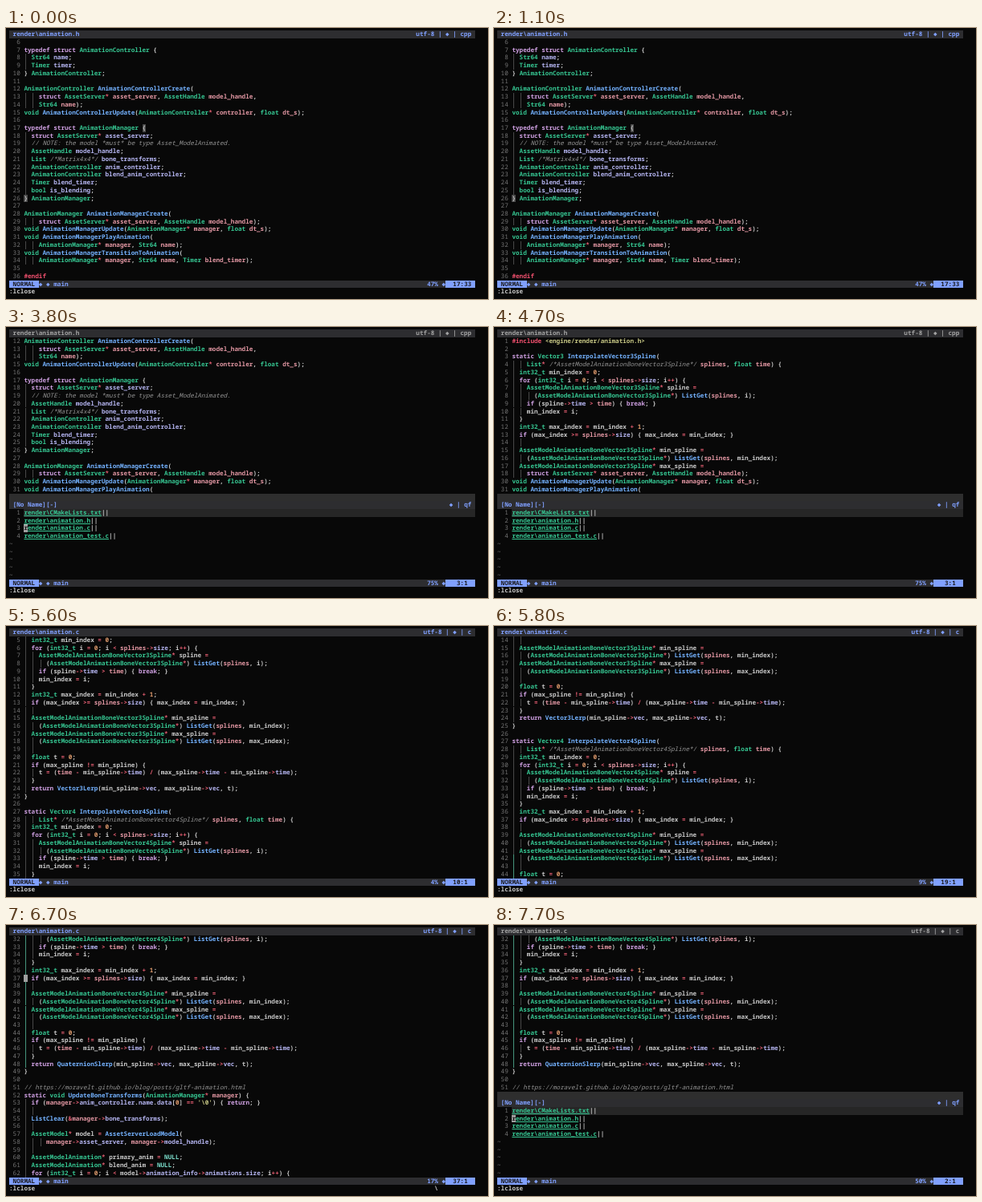
An HTML page for the animation above (8000 ms loop, 600 by 338 pixels).

```html
<!DOCTYPE html>
<html lang="en">
<head>
<meta charset="utf-8">
<title>Editor session</title>
<style>
html, body { margin: 0; width: 100%; height: 100%; overflow: hidden; background: #080808; }
#screen {
  position: absolute; left: 0; top: 0; width: 600px; height: 338px; overflow: hidden;
  font: 600 7.672px/11.9px "Noto Sans Mono", "DejaVu Sans Mono", monospace;
  font-variant-ligatures: none; text-rendering: geometricPrecision;
  color: #c8c8c8;
}
#screen div { position: absolute; white-space: pre; height: 9.73px; }
.bar { background: #2d2d30; }
.blue { color: #80a0ff; }
.idle { color: #a2a2a2; }
.mode { color: #1c1c20; }
.modeBg { background: #80a0ff; }
.split { background: #2e2e2e; }
.pick { background: #262626; }
.num { color: #747474; font-weight: 500; }
.tilde { color: #5a5a5a; }
.guide { width: 1px; background: #484848; }
.scope { background: #46947c; }
.cursor { background: #a0a0a0; color: #181818; }
.match { background: #484848; }
.file { color: #36c692; text-decoration: underline; text-decoration-thickness: 0.7px; }
.sym { font-family: "DejaVu Sans Mono", monospace; font-weight: 400; line-height: 0; }
.comment { color: #949494; font-style: italic; font-weight: 500; }
.pre { color: #f0506e; }
.str { color: #c6c684; }
.key { color: #cfa0e2; }
.type { color: #36c692; }
.func { color: #74b2ff; }
.const { color: #79dac8; }
.digit { color: #de9a6c; }
.op { color: #e65e72; }
.field { color: #b4b4f0; }
.param { color: #e196a2; }
</style>
</head>
<body>
<div id="screen"></div>
<script>
const CW = 4.6032, RH = 9.73, X0 = 4, Y0 = 3.2, COLS = 126, LOOP = 8000, ROWS = 31;
const screen = document.getElementById('screen');

const header = `





typedef struct AnimationController {
  Str64 name;
  Timer timer;
} AnimationController;

AnimationController AnimationControllerCreate(
    struct AssetServer* asset_server, AssetHandle model_handle,
    Str64 name);
void AnimationControllerUpdate(AnimationController* controller, float dt_s);

typedef struct AnimationManager {
  struct AssetServer* asset_server;
  // NOTE: the model *must* be type Asset_ModelAnimated.
  AssetHandle model_handle;
  List /*Matrix4x4*/ bone_transforms;
  AnimationController anim_controller;
  AnimationController blend_anim_controller;
  Timer blend_timer;
  bool is_blending;
} AnimationManager;

AnimationManager AnimationManagerCreate(
    struct AssetServer* asset_server, AssetHandle model_handle);
void AnimationManagerUpdate(AnimationManager* manager, float dt_s);
void AnimationManagerPlayAnimation(
    AnimationManager* manager, Str64 name);
void AnimationManagerTransitionToAnimation(
    AnimationManager* manager, Str64 name, Timer blend_timer);

#endif`.split('\n');

const spline = (vec, mix) => {
  const T = `AssetModelAnimationBone${vec}Spline`;
  return `static ${vec} Interpolate${vec}Spline(
    List* /*${T}*/ splines, float time) {
  int32_t min_index = 0;
  for (int32_t i = 0; i < splines->size; i++) {
    ${T}* spline =
      (${T}*) ListGet(splines, i);
    if (spline->time > time) { break; }
    min_index = i;
  }
  int32_t max_index = min_index + 1;
  if (max_index >= splines->size) { max_index = min_index; }

  ${T}* min_spline =
    (${T}*) ListGet(splines, min_index);
  ${T}* max_spline =
    (${T}*) ListGet(splines, max_index);

  float t = 0;
  if (max_spline != min_spline) {
    t = (time - min_spline->time) / (max_spline->time - min_spline->time);
  }
  return ${mix}(min_spline->vec, max_spline->vec, t);
}
`;
};

const code = `#include <engine/render/animation.h>

${spline('Vector3', 'Vector3Lerp')}
${spline('Vector4', 'QuaternionSlerp')}
// https://moravelt.github.io/blog/posts/gltf-animation.html
static void UpdateBoneTransforms(AnimationManager* manager) {
  if (manager->anim_controller.name.data[0] == '\\0') { return; }

  ListClear(&manager->bone_transforms);

  AssetModel* model = AssetServerLoadModel(
      manager->asset_server, manager->model_handle);

  AssetModelAnimation* primary_anim = NULL;
  AssetModelAnimation* blend_anim = NULL;
  for (int32_t i = 0; i < model->animation_info->animations.size; i++) {`.split('\n');

const quickfix = ['CMakeLists.txt', 'animation.h', 'animation.c', 'animation_test.c'];

const TOKEN = /\/\*.*?\*\/|\/\/.*|#\w+|<[\w/.]+>|'[^']*'|\w+|->|[=+\-*\/<>!&]+|\s+|./g;
const KEYS = /^(typedef|struct|static|for|if|return|break)$/;
const BUILTIN = /^(void|float|bool|int32_t)$/;
const FIELDS = /^(name|timer|asset_server|model_handle|bone_transforms|\w*anim_controller|blend_timer|is_blending)$/;
const PARAMS = /^(name|asset_server|model_handle|controller|dt_s|manager|blend_timer|splines|time)$/;

function kind(tok, prev, next) {
  if (/^\/[/*]/.test(tok)) return 'comment';
  if (tok[0] === '#') return 'pre';
  if (/^(<\w|')/.test(tok)) return 'str';
  if (/^\d/.test(tok)) return 'digit';
  if (KEYS.test(tok)) return 'key';
  if (BUILTIN.test(tok)) return 'type';
  if (tok === 'NULL') return 'const';
  if (/^[A-Z]/.test(tok)) return next === '(' ? 'func' : 'type';
  if (prev === '->' || prev === '.' || (next === ';' && FIELDS.test(tok))) return 'field';
  if (PARAMS.test(tok)) return 'param';
  return /^[=+\-*\/<>!&]/.test(tok) ? 'op' : '';
}

function box(row, col, cls, cells) {
  const d = document.createElement('div');
  d.className = cls;
  d.style.left = X0 + col * CW + 'px';
  d.style.top = Y0 + row * RH + 'px';
  if (cells) d.style.width = cells * CW + 'px';
  screen.append(d);
  return d;
}

function span(parent, str, cls) {
  const s = document.createElement('span');
  s.textContent = str;
  s.className = cls;
  parent.append(s);
}

function put(row, col, str, cls = '') {
  const d = box(row, col, cls);
  for (const part of str.split(/(◆)/)) span(d, part, part === '◆' ? 'sym' : '');
}

function putCode(row, lines, n, label, scope) {
  const line = lines[n - 1] || '';
  put(row, 0, String(label).padStart(3), 'num');
  const blankInside = !line && /^ /.test(lines[n] || '');
  const guides = blankInside ? 2 : line.search(/\S|$/) / 2;
  for (let g = 0; g < guides; g++) {
    const lit = g === 0 && scope && n >= scope[0] && n <= scope[1];
    box(row, 4 + g * 2, lit ? 'guide scope' : 'guide').style.marginLeft = '1.8px';
  }
  const d = box(row, 4, '');
  const toks = line.match(TOKEN) || [];
  toks.forEach((t, i) => span(d, t, kind(t, toks[i - 1], toks[i + 1])));
}

function title(row, left, right, cls) {
  box(row, 0, 'bar', COLS);
  put(row, 1, left, cls);
  put(row, 125 - right.length, right, cls);
}

function status(line, col, total) {
  box(32, 0, 'bar', COLS);
  box(32, 0, 'modeBg', 8);
  box(32, 118, 'modeBg', 8);
  put(32, 1, 'NORMAL', 'mode');
  put(32, 8, '◆ ◆ main', 'blue');
  put(32, 113, String(Math.floor(line / total * 100)).padStart(2) + '% ◆', 'blue');
  put(32, 119, String(line).padStart(3) + ':' + col, 'mode');
}

function drawList(pick, showCursor) {
  box(21, 0, 'split', COLS);
  title(22, '[No Name][-]', '◆ | qf', 'blue');
  box(23, 4, 'pick', COLS - 4);
  quickfix.forEach((name, i) => {
    put(23 + i, 0, String(i + 1).padStart(3), 'num');
    const d = box(23 + i, 4, '');
    span(d, 'render\\' + name, 'file');
    span(d, '||', '');
  });
  for (let r = 27; r < 32; r++) put(r, 0, '~', 'tilde');
  if (showCursor) put(22 + pick, 4, 'r', 'cursor');
  status(pick, 1, 4);
}

function draw(s) {
  screen.replaceChildren();
  const lines = s.file === 'h' ? header : code;
  const count = s.pick ? 20 : ROWS;
  const ext = s.file === 'h' || s.torn ? 'h' : 'c';
  title(0, 'render\\animation.' + ext, 'utf-8 | ◆ | ' + (ext === 'h' ? 'cpp' : 'c'), s.pick ? 'idle' : 'blue');

  // matching braces of the struct under the cursor
  if (s.braces) {
    box(12, 36, 'match', 1);
    box(21, 4, 'match', 1);
  }
  for (let r = 1; r <= count; r++) {
    const n = s.top + r - 1;
    if (s.torn && r >= 18) putCode(r, header, r + 11, r === 18 ? 18 : r + 11);
    else putCode(r, lines, n, n, s.scope);
  }

  if (s.pick) drawList(s.pick, !s.torn);
  else {
    status(s.line, s.col, s.file === 'h' ? 36 : 211);
    if (!s.moving && !s.braces) {
      const ch = (lines[s.line - 1] || '')[s.col - 1] || ' ';
      put(s.line - s.top + 1, 3 + s.col, ch, 'cursor');
    }
  }
  put(33, 0, ':lclose');
  if (s.leader) put(33, 115, '\\');
}

function stateAt(t) {
  if (t < 1800) return { file: 'h', top: 6, line: 17, col: 33, braces: true, leader: t >= 1700 };
  if (t < 4700) {
    const pick = t < 2400 ? 1 : t < 2500 ? 2 : t < 3000 ? 3 : t < 3800 ? 4 : 3;
    return { file: 'h', top: 12, pick };
  }
  if (t < 4800) return { file: 'c', top: 1, pick: 3, torn: true };
  if (t < 5600) return { file: 'c', top: 1, line: 1, col: 1 };
  if (t < 6200) {
    // seven even scroll steps, one each 100 ms
    const step = Math.floor((t - 5600) / 100) + 1;
    const top = 1 + Math.round(31 * step / 7);
    return { file: 'c', top, line: top + 5, col: 1, moving: true, scope: [42, 48] };
  }
  const base = { file: 'c', top: 32, scope: [28, 48] };
  if (t < 6800) return { ...base, line: 37, col: 1, leader: t >= 6600 };
  return { ...base, pick: t < 7600 ? 1 : 2 };
}

let shown = '';
function frame() {
  const s = stateAt(performance.now() % LOOP);
  const key = JSON.stringify(s);
  if (key !== shown) {
    shown = key;
    draw(s);
  }
  requestAnimationFrame(frame);
}
frame();
</script>
</body>
</html>
```
